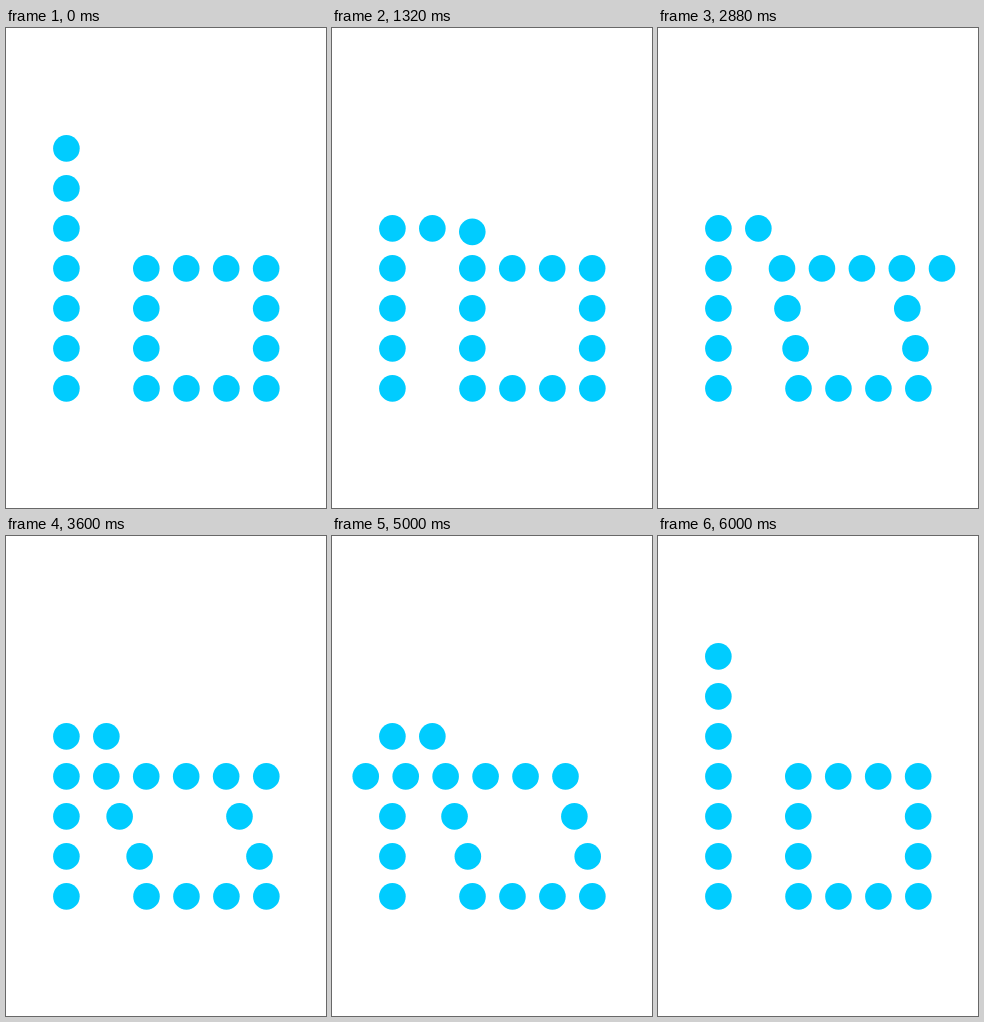
These frames come from a looping animation (320x480 px, 6580 ms). An HTML page:

```html
<!DOCTYPE html>
<html lang="en">
<head>
<meta charset="utf-8">
<title>Dots</title>
<style>
html, body { margin: 0; width: 100%; height: 100%; overflow: hidden; background: #fff; }
svg { display: block; width: 100%; height: 100%; fill: #00ccff; }
</style>
</head>
<body>
<svg id="stage" viewBox="0 0 320 480"></svg>
<script>
const LOOP = 6580, STEP = 40, R = 13.3, GAP = 40;
// Times at which one motion hands over to the next.
const FLAT = 1180, ROLL = 1360, EDGE = 2040, PUSH = 2440, STOP = 3520;
const LEAVE = 3600, WRAP = 4290, HIT = 4800, HOME = 5400, END = 6000;

const stage = document.getElementById('stage');
const col = c => 60.4 + 39.95 * c;
const row = r => 120.4 + GAP * r;
const ramp = (t, a, b) => Math.max(0, Math.min(1, (t - a) / (b - a)));

function dot(x = 0, y = 0) {
  const el = document.createElementNS('http://www.w3.org/2000/svg', 'circle');
  el.setAttribute('r', R);
  stage.append(el);
  place(el, [x, y]);
  return el;
}

function place(el, [x, y]) {
  el.setAttribute('cx', x);
  el.setAttribute('cy', y);
}

// The lower stem and the bottom of the bowl stay put.
for (const r of [2, 4, 5, 6]) dot(col(0), row(r));
for (let c = 2; c <= 5; c++) dot(col(c) + 0.2, row(6));

// The rest of the bowl leans with the push, its upper rows the most.
const bowl = [];
for (let r = 3; r <= 5; r++) {
  for (let c = 2; c <= 5; c += r === 3 ? 1 : 3) {
    bowl.push({ x: col(c), y: row(r), pull: [1, 2 / 3, 1 / 6][r - 3], el: dot() });
  }
}
const near = dot(), roller = dot(), neck = dot();

const shove = t => GAP * (ramp(t, PUSH, STOP) - ramp(t, HIT, HOME));

// The top two dots fall sideways as a bar that stretches slightly.
function swing(t, n) {
  const a = Math.PI / 2 * ramp(t, 0, FLAT);
  const r = n * (GAP + Math.sin(2 * a));
  return [col(0) + r * Math.sin(a), row(2) - r * Math.cos(a)];
}

// Curved climb back to the top of the stem.
function climb(t, start, r) {
  const p = ramp(t, start, END);
  return [col(1) + 33 * p - 73 * p * p, row(r) - 2 * GAP * p];
}

function nearAt(t) {
  return t < FLAT ? swing(t, 1) : climb(t, HOME - 50, 2);
}

function neckAt(t) {
  return t < HOME ? [col(ramp(t, HIT, HOME)), row(3)] : climb(t, HOME, 3);
}

// Dips, rolls right, drops, pushes the row, leaves and re-enters at the left.
function rollerAt(t) {
  if (t < FLAT) return swing(t, 2);
  if (t >= WRAP) return [col(0) - 74 * (1 - ramp(t, WRAP, HOME)), row(3)];
  const dip = 8.4 * Math.sin(Math.PI * ramp(t, FLAT, ROLL)) ** 2;
  return [
    col(2) + 4 * GAP * ramp(t, ROLL, EDGE) - shove(t) + 74 * ramp(t, LEAVE, WRAP),
    row(2) + dip + GAP * ramp(t, EDGE, PUSH)
  ];
}

function draw(t) {
  for (const d of bowl) place(d.el, [d.x - shove(t) * d.pull, d.y]);
  place(near, nearAt(t));
  place(roller, rollerAt(t));
  place(neck, neckAt(t));
}

const start = performance.now();
function tick() {
  const t = (performance.now() - start) % LOOP;
  draw(Math.floor(t / STEP) * STEP);
  requestAnimationFrame(tick);
}
tick();
</script>
</body>
</html>
```
